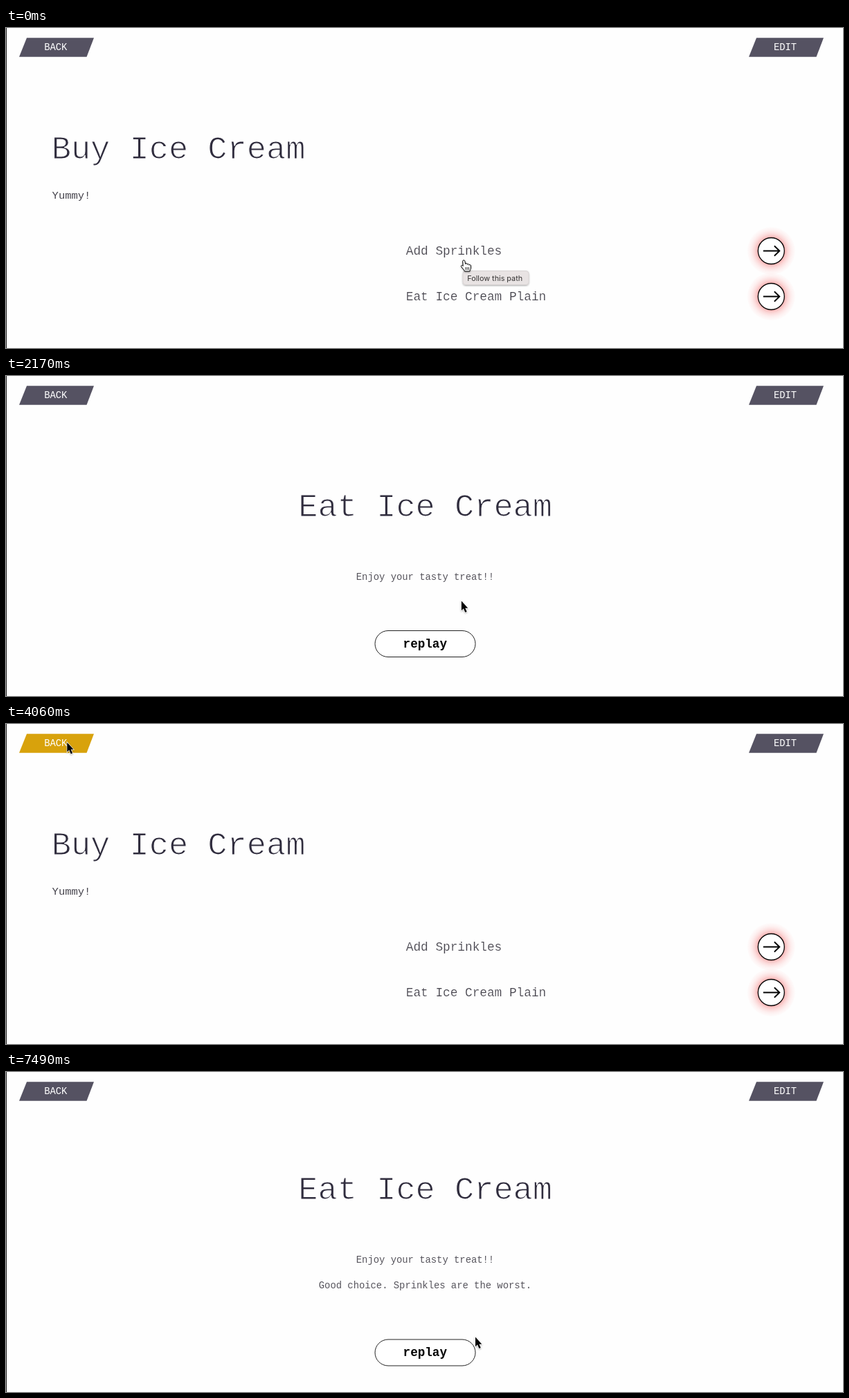
These frames come from a looping animation (1209x463 px, 7560 ms). An HTML page:

```html
<!DOCTYPE html>
<html lang="en">
<head>
<meta charset="utf-8">
<title>Ice cream story</title>
<style>
  html, body { margin: 0; width: 100%; height: 100%; overflow: hidden; background: #fefefe; }
  svg { display: block; }
  text { font-family: "Courier New", "Liberation Mono", monospace; fill: #45434c; }
  /* a paper-coloured stroke thins the letters */
  .title { font-size: 47px; fill: #302d3e; stroke: #fefefe; stroke-width: 1.2px; }
  .mid { text-anchor: middle; }
  .small { font-size: 13.85px; }
  .note { fill: #56545c; }
  .link { font-size: 17.75px; stroke: #fefefe; stroke-width: .2px; }
  .nav text { fill: #fff; }
  .replay { font-size: 17.6px; font-weight: bold; fill: #000; }
  #tip text { font: 10.8px Inter, "Open Sans", sans-serif; fill: #353333; }
</style>
</head>
<body>
<svg width="1209" height="463" viewBox="0 0 1209 463">
  <defs>
    <radialGradient id="glow">
      <stop offset=".5" stop-color="#f47c7c" stop-opacity=".75"/>
      <stop offset=".68" stop-color="#f79a9a" stop-opacity=".42"/>
      <stop offset=".85" stop-color="#fab4b4" stop-opacity=".2"/>
      <stop offset="1" stop-color="#fcc" stop-opacity=".06"/>
    </radialGradient>
    <filter id="shadow" x="-50%" y="-50%" width="200%" height="200%">
      <feDropShadow dx="0" dy="1" stdDeviation="1" flood-opacity=".35"/>
    </filter>
    <path id="slant" d="M11 0H108L97.5 27.5H0Z"/>
    <g id="go">
      <circle r="34.5" fill="url(#glow)"/>
      <circle r="19" fill="#fff" stroke="#000" stroke-width="1.3"/>
      <path d="M-11.5 0H12M4.5-7.3L12 0L4.5 7.3" fill="none" stroke="#000" stroke-width="1.9"/>
    </g>
  </defs>

  <path d="M.5 0V463" stroke="#222"/>

  <g class="nav small mid" fill="#555262">
    <use id="back" href="#slant" x="19" y="14.2"/>
    <text x="71.8" y="32">BACK</text>
    <use href="#slant" x="1073" y="14.2"/>
    <text x="1125.5" y="32">EDIT</text>
  </g>

  <g id="buy">
    <text class="title" x="65.7" y="189">Buy Ice Cream</text>
    <text x="66.6" y="246.5" font-size="15.5">Yummy!</text>
    <text class="link" x="577.8" y="328">Add Sprinkles</text>
    <text class="link" x="577.8" y="394">Eat Ice Cream Plain</text>
    <use href="#go" x="1105.3" y="322.5"/>
    <use href="#go" x="1105.3" y="388.5"/>
  </g>

  <g id="eat" class="mid">
    <g id="top">
      <text class="title" x="605.7" y="203">Eat Ice Cream</text>
      <text class="small note" x="605.5" y="295">Enjoy your tasty treat!!</text>
    </g>
    <text id="extra" class="small note" x="605.5" y="313">Good choice. Sprinkles are the worst.</text>
    <g id="bottom">
      <rect x="533" y="368.5" width="145" height="38" rx="19" fill="#fff" stroke="#222"/>
      <text class="replay" x="605.3" y="392.5">replay</text>
    </g>
  </g>

  <g id="tip" filter="url(#shadow)">
    <rect x="660" y="351.5" width="95" height="20" rx="4" fill="#e8e3e3" stroke="#d5d0d0" stroke-width=".8"/>
    <text x="666.3" y="365.5">Follow this path</text>
  </g>

  <g id="cursor">
    <circle id="ring" r="29.3" fill="none" stroke="#222" stroke-width="1.8"/>
    <path id="arrow" filter="url(#shadow)" stroke="#fff" stroke-width="1.2" paint-order="stroke"
      d="M0-.5V13.2L3 10.5L5.4 16L7.8 15L5.4 9.7H9.3Z"/>
    <g id="hand" filter="url(#shadow)" stroke="#000">
      <path fill="#fff" d="M-1.8 8.5L-2.3 1.4C-2.3-.5.4-.6.8 1.2L1.6 5.5C1.8 4 4 4 4.2 5.5V6.3C4.6 5 6.6 5.2 6.8 6.6V7.2C7.4 6 9.4 6.3 9.4 8V11C9.4 13 8 13.6 8 16H.5C0 13.8-4.6 10-4.6 8.6C-4.6 7-2.8 7.2-1.8 8.5Z"/>
      <path fill="none" stroke-width=".8" d="M2 10V14M4.2 10V14M6.4 10V14"/>
    </g>
  </g>
</svg>
<script>
const LOOP = 7560, STEP = 70;
const el = id => document.getElementById(id);
const clamp = v => Math.min(1, Math.max(0, v));
const progress = (t, from, to) => clamp((t - from) / (to - from));
const show = (id, on) => el(id).setAttribute("display", on ? "inline" : "none");
const shift = (id, x, y) => el(id).setAttribute("transform", `translate(${x} ${y})`);
const within = (t, from, to) => t >= from && t < to;

// Slow start set by a, quick finish set by b
const ease = (u, a, b) => 1 - (1 - u ** a) ** b;

// Pointer strokes between resting places; sag bows the line downwards
const rest = { x: 662, y: 336 };
const strokes = [
  { from: 140, to: 560, x: 658, y: 326, a: 1, b: 2, sag: 0 },
  { from: 1960, to: 3500, x: 76, y: 17, a: 5.7, b: 19.9, sag: 15 },
  { from: 4025, to: 5810, x: 678, y: 384, a: 1.2, b: 2.3, sag: 33 }
];

function pointer(t) {
  let { x, y } = rest;
  for (const s of strokes) {
    const k = ease(progress(t, s.from, s.to), s.a, s.b);
    x += (s.x - x) * k;
    y += (s.y - y) * k + s.sag * 4 * k * (1 - k);
  }
  return [x, y];
}

function draw(now) {
  const t = Math.floor((now % LOOP) / STEP) * STEP;
  const buy = t < 1470 || within(t, 3920, 6650);
  const long = t >= 6650;
  const hand = t < 1400 || within(t, 3570, 3850) || within(t, 5460, 6580);

  show("buy", buy);
  show("eat", !buy);
  show("extra", long);
  shift("top", 0, long ? -18.7 : 0);
  shift("bottom", 0, long ? 18.5 : 0);

  const hover = progress(t, 3010, 3150) - progress(t, 4130, 4270);
  el("back").style.fill = `color-mix(in srgb, #d8a20c ${hover * 100}%, #555262)`;
  el("tip").setAttribute("opacity", 1 - progress(t, 140, 560));

  shift("cursor", ...pointer(t));
  show("hand", hand);
  show("arrow", !hand);
  show("ring", within(t, 1120, 1330) || within(t, 6370, 6510));
}

const start = performance.now();
function tick() {
  draw(performance.now() - start);
  requestAnimationFrame(tick);
}
tick();
</script>
</body>
</html>
```
